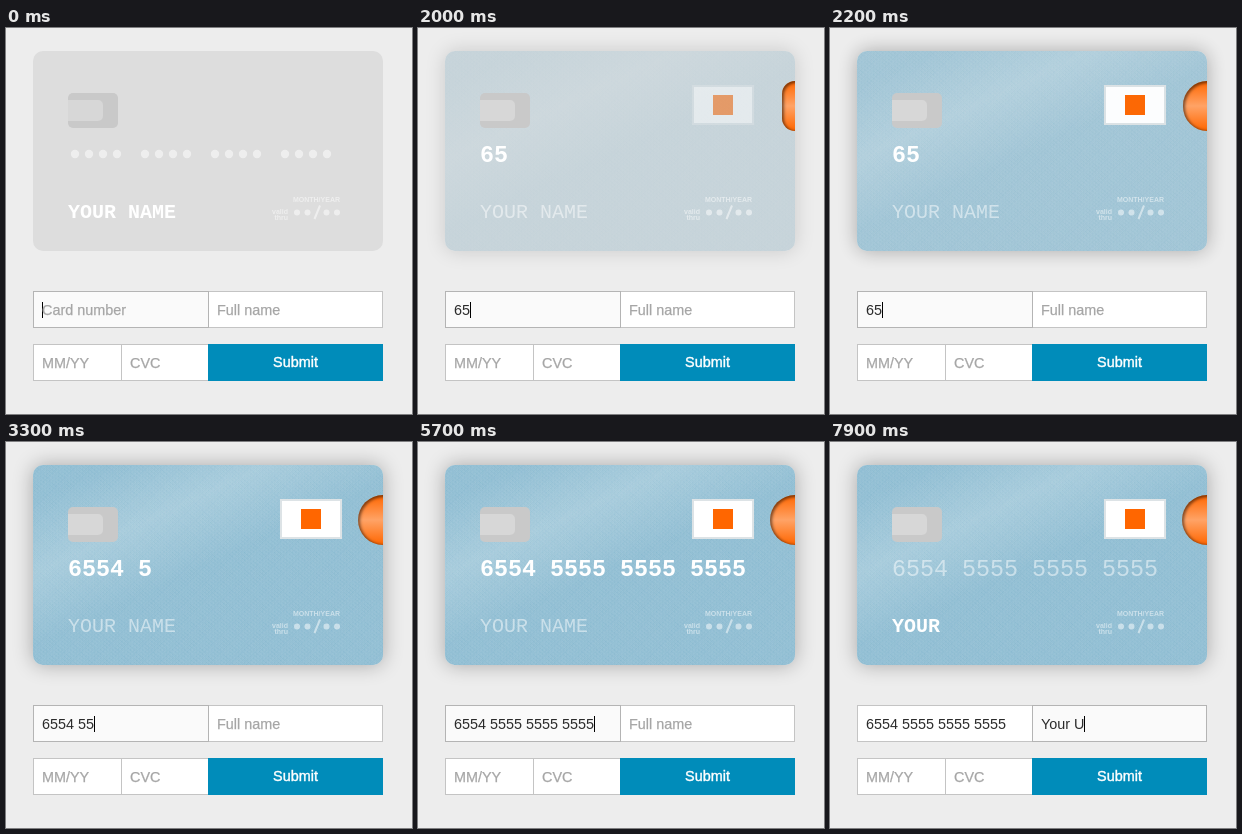
Animation, 406 px wide and 386 px high, one loop 8000 ms. Source, as an HTML page:

```html
<!DOCTYPE html>
<html lang="en">
<head>
<meta charset="utf-8">
<title>Card form</title>
<style>
  html, body { margin: 0; width: 100%; height: 100%; overflow: hidden; background: #ededed; }
  #stage { position: relative; width: 406px; height: 386px; overflow: hidden; }
  #stage div, svg { position: absolute; box-sizing: border-box; }

  #card { left: 27px; top: 23px; width: 350px; height: 200px; border-radius: 10px; background: #ddd; overflow: hidden; }
  #shadow { left: 27px; top: 23px; width: 350px; height: 200px; border-radius: 10px; box-shadow: 0 0 20px rgba(0,0,0,.3); }
  #skin {
    inset: 0;
    --weave: rgba(255,255,255,0) 1px, rgba(255,255,255,.03) 2px, rgba(255,255,255,.04) 3px, rgba(255,255,255,.05) 4px;
    background:
      repeating-linear-gradient(45deg, var(--weave)),
      repeating-linear-gradient(135deg, var(--weave)),
      repeating-linear-gradient(90deg, var(--weave)),
      repeating-linear-gradient(210deg, var(--weave)),
      linear-gradient(-25deg, rgba(255,255,255,0) 50%, rgba(255,255,255,.2) 70%, rgba(255,255,255,0) 90%),
      #86b8cf;
  }
  #chip { left: 35px; top: 42px; width: 50px; height: 35px; border-radius: 5px; background: #c9c9c9; }
  #chip div { top: 7px; width: 35px; height: 21px; border-radius: 0 5px 5px 0; background: #d7d7d7; }
  #plate { left: 247px; top: 34px; width: 62px; height: 40px; background: #fff; border: 2px solid #dde3e6; }
  #plate div { left: 19px; top: 8px; width: 20px; height: 20px; background: #f60; }
  #disc {
    left: 350px; top: 30px; width: 50px; height: 50px;
    background: linear-gradient(#f60, #ffa366, #f60);
    box-shadow: inset 1px 1px 3px 1px rgba(0,0,0,.5);
  }

  .field {
    height: 37px; padding-left: 8px; border: 1px solid #c4c4c4; background: #fff;
    font: 14.4px/36px "Liberation Sans", Arial, sans-serif; color: #2b2b2b; white-space: pre;
  }
  .field.focus { background: #fafafa; border-color: #b4b4b4; }
  .field i { display: inline-block; width: 1px; height: 16px; margin-right: -1px; background: #000; vertical-align: -3px; visibility: hidden; }
  .field.focus i { visibility: visible; }
  .field span { color: #a6a6a6; -webkit-text-stroke: .25px #a6a6a6; }
  #submit { padding: 0; border: 0; background: #008cba; color: #fff; text-align: center; -webkit-text-stroke: .4px #fff; }

  svg { left: 0; top: 0; }
  svg text { fill: #fff; white-space: pre; }
  .mono { font-family: "Liberation Mono", monospace; }
  .label { font: bold 7px "Liberation Sans", Arial, sans-serif; }
</style>
</head>
<body>
<div id="stage">
  <div id="shadow"></div>
  <div id="card">
    <div id="skin"></div>
    <div id="chip"><div></div></div>
    <div id="plate"><div></div></div>
    <div id="disc"></div>
  </div>

  <div class="field" id="nameField" style="left:202px;top:263px;width:175px"><b style="font-weight:400"></b><i></i><span>Full name</span></div>
  <div class="field" id="numberField" style="left:27px;top:263px;width:176px"><b style="font-weight:400"></b><i></i><span>Card number</span></div>
  <div class="field" style="left:27px;top:316px;width:89px"><span>MM/YY</span></div>
  <div class="field" style="left:115px;top:316px;width:88px"><span>CVC</span></div>
  <div class="field" id="submit" style="left:202px;top:316px;width:175px">Submit</div>

  <svg width="406" height="386">
    <g id="number">
      <g id="dots" fill="#fff"></g>
      <text id="numberText" class="mono" x="62" y="134" font-size="23.33"></text>
    </g>
    <text id="nameText" class="mono" x="62" y="189.5" font-size="20"></text>
    <g opacity=".5" fill="#fff">
      <text class="label" x="334" y="174" text-anchor="end">MONTH/YEAR</text>
      <text class="label" x="282" y="185.5" text-anchor="end">valid</text>
      <text class="label" x="282" y="192" text-anchor="end">thru</text>
      <circle cx="291" cy="184.5" r="3"/><circle cx="301.5" cy="184.5" r="3"/>
      <circle cx="320.5" cy="184.5" r="3"/><circle cx="331" cy="184.5" r="3"/>
      <path d="M308.5 191L314 177.5" stroke="#fff" stroke-width="2"/>
    </g>
    <g id="pointer" fill="none">
      <path id="beam" d="M-3 -7.5Q0 -7.5 0 -5.5Q0 -7.5 3 -7.5M0 -5.5V6M-3 8Q0 8 0 6Q0 8 3 8M-2 3H2" stroke="#fff" stroke-width="3" opacity=".7"/>
      <use href="#beam" style="stroke:#000"/>
    </g>
  </svg>
</div>

<script>
const LOOP = 8000;
const $ = id => document.getElementById(id);
const clamp = x => Math.max(0, Math.min(1, x));
const progress = (t, start, length) => clamp((t - start) / length);
const countUntil = (times, t) => times.filter(time => time <= t).length;

const DIGITS = "6554555555555555";
const NAME = "Your U";
const digitKeys  = [1700, 1800, 2300, 2700, 3100, 3300, 3500, 3700, 3900, 4150, 4400, 4600, 4800, 5100, 5300, 5600];
const digitShown = [1800, 1880, 2400, 2900, 3200, 3400, 3600, 3800, 4000, 4300, 4500, 4700, 4900, 5200, 5400, 5700];
const nameKeys   = [6800, 7000, 7200, 7300, 7600, 7900];
const nameShown  = nameKeys.map(t => t + 100);
const IDENTIFIED = 1880, NAME_FOCUS = 6200, FADE = 300;

// CSS "ease": cubic-bezier(.25, .1, .25, 1)
function ease(x) {
  let lo = 0, hi = 1, u;
  for (let i = 0; i < 24; i++) {
    u = (lo + hi) / 2;
    const at = .75 * u * (1 - u) ** 2 + .75 * u * u * (1 - u) + u ** 3;
    if (at < x) lo = u; else hi = u;
  }
  return .3 * u * (1 - u) ** 2 + 3 * u * u * (1 - u) + u ** 3;
}

// A space follows each full group of four, except the last.
const group = digits => digits.replace(/(\d{4})(?=.|$)/g, "$1 ").slice(0, 19);

for (let i = 0; i < 16; i++) {
  const x = 69 + 14 * (i + Math.floor(i / 4));
  $("dots").innerHTML += `<circle cx="${x}" cy="126" r="4.2"/>`;
}

function setField(id, value, focused) {
  const field = $(id);
  field.classList.toggle("focus", focused);
  field.style.zIndex = focused ? 1 : 0;
  field.querySelector("b").textContent = value;
  field.querySelector("span").style.display = value ? "none" : "";
}

function setFocus(group, text, amount) {
  group.style.opacity = .5 + .5 * amount;
  text.style.fontWeight = amount > .5 ? 700 : 400;
}

function render(t) {
  const onName = t >= NAME_FOCUS;
  setField("numberField", group(DIGITS.slice(0, countUntil(digitKeys, t))), !onName);
  setField("nameField", NAME.slice(0, countUntil(nameKeys, t)), onName);

  const shown = group(DIGITS.slice(0, countUntil(digitShown, t))).trim();
  $("numberText").textContent = shown;
  $("dots").style.display = shown ? "none" : "";
  $("nameText").textContent = NAME.slice(0, countUntil(nameShown, t)).trim().toUpperCase() || "YOUR NAME";

  const numberFocus = progress(t, 1100, FADE) - progress(t, NAME_FOCUS, FADE);
  setFocus($("number"), $("numberText"), numberFocus);
  setFocus($("nameText"), $("nameText"), 1 - numberFocus);

  const linear = progress(t, IDENTIFIED, 400), eased = ease(linear);
  $("skin").style.opacity = linear;
  $("shadow").style.opacity = $("plate").style.opacity = eased;
  $("disc").style.marginLeft = -25 * eased + "px";
  $("disc").style.borderRadius = 25 * eased + "px";
  $("disc").style.visibility = linear > 0 ? "visible" : "hidden";

  const pointerX = 89.5 + 2 * progress(t, 1100, FADE);
  $("pointer").setAttribute("transform", `translate(${pointerX} 281.5)`);
  $("pointer").style.display = t < 2400 ? "" : "none";
}

const begin = performance.now();
function tick() {
  render((performance.now() - begin) % LOOP);
  requestAnimationFrame(tick);
}
tick();
</script>
</body>
</html>
```
